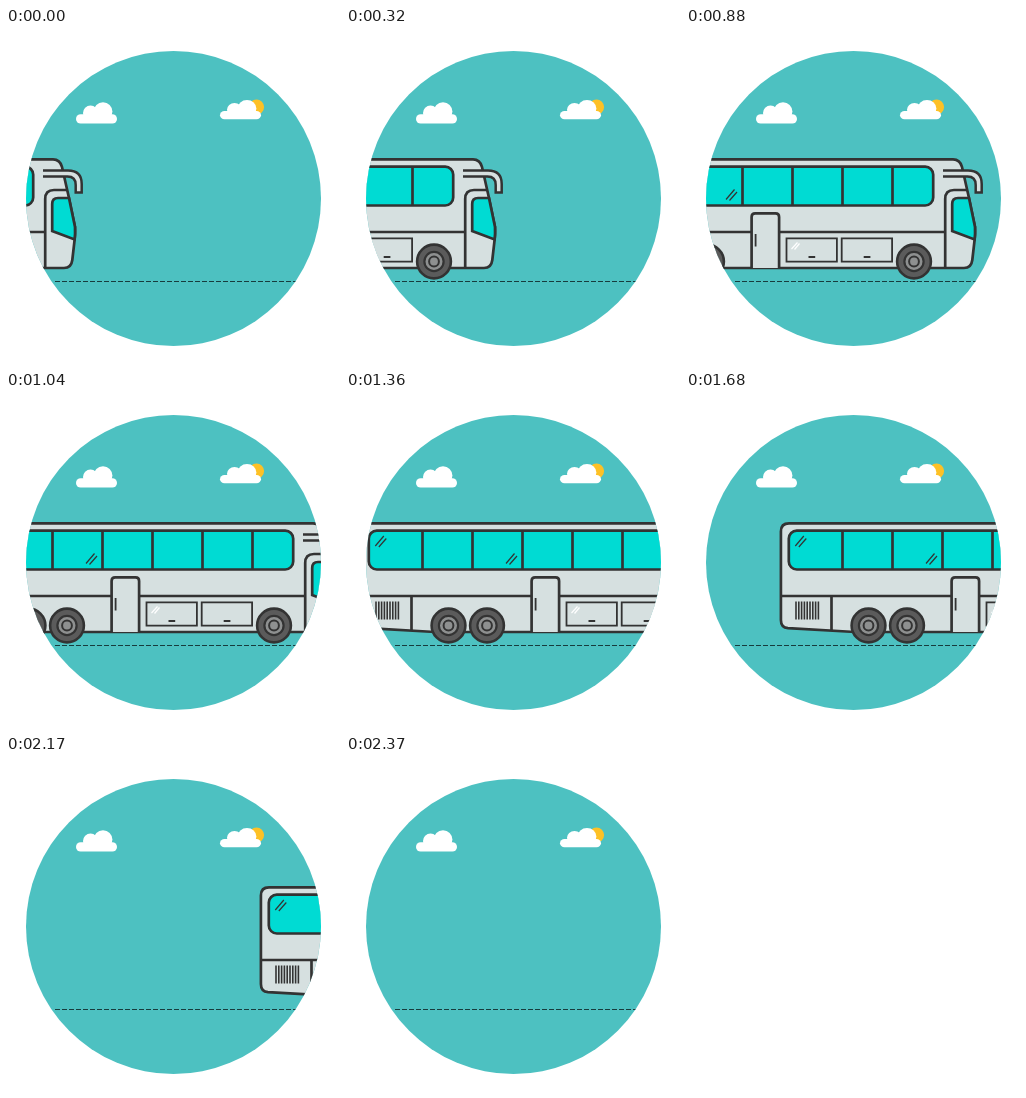
Write an HTML page with a canvas that moves like this. It is 334 by 336 pixels and loops after 2.42 s.

```html
<!DOCTYPE html>
<html lang="en">
<head>
<meta charset="utf-8">
<title>Passing coach</title>
<style>
  html, body { margin: 0; width: 100%; height: 100%; overflow: hidden; background: #fff; }
  canvas { display: block; }
</style>
</head>
<body>
<canvas id="stage" width="334" height="336"></canvas>
<script>
const ctx = document.getElementById('stage').getContext('2d');
const LOOP = 2420, STEP = 20, START = -326;
const SKY = '#4dc1c1', INK = '#333', BODY = '#d6e0e0', GLASS = '#00dbd3';

function paint(path, fill, width = 2.7, stroke = INK) {
  if (fill) {
    ctx.fillStyle = fill;
    ctx.fill(path);
  }
  if (width) {
    ctx.strokeStyle = stroke;
    ctx.lineWidth = width;
    ctx.stroke(path);
  }
}

function shape(d, fill, width, stroke) {
  paint(new Path2D(d), fill, width, stroke);
}

function line(x1, y1, x2, y2, width, stroke) {
  shape(`M${x1} ${y1}L${x2} ${y2}`, null, width, stroke);
}

function disc(x, y, r, fill, width = 0) {
  const path = new Path2D();
  path.arc(x, y, r, 0, Math.PI * 2);
  paint(path, fill, width);
}

function box(x, y, w, h, r, fill, width) {
  const path = new Path2D();
  path.roundRect(x, y, w, h, r);
  paint(path, fill, width);
}

function cloud(x, y, h) {
  box(x, y - h, 41, h, h / 2, '#fff', 0);
  disc(x + 14.5, y - 10.5, 7.5, '#fff');
  disc(x + 27, y - 12, 9.4, '#fff');
  box(x + 8, y - h - 4, 26, 8, 2, '#fff', 0);
}

function scenery() {
  ctx.fillStyle = SKY;
  ctx.fillRect(0, 0, 334, 336);
  disc(250.5, 79, 7.6, '#fdc126');
  cloud(70, 95.6, 9.4);
  ctx.save();
  ctx.translate(214, 91.2);
  ctx.scale(1, 0.9);
  cloud(0, 0, 9);
  ctx.restore();
  ctx.setLineDash([5, 2]);
  line(49, 253.5, 291, 253.5, 1, '#173c3d');
  ctx.setLineDash([]);
}

function wheel(x) {
  const y = 233.5;
  disc(x, y, 16.9, '#5b5b5b', 2.6);
  disc(x, y, 9.6, '#8e9090', 2.2);
  disc(x, y, 4.9, '#8e9090', 2);
}

function glint(x, y) {
  line(x, y + 10, x + 8.5, y, 1.2);
  line(x + 3.5, y + 11, x + 11, y + 2.5, 1.2);
}

function bus() {
  const outline = 'M9 131.4H373Q380 131.4 382 139L389 170L395 199' +
    'Q395.3 206 394.6 212L392.3 232Q391.3 240 384 240H75' +
    'L8 236.2Q.9 235.6 .9 228V139.5Q.9 131.4 9 131.4Z';
  shape(outline, BODY);
  line(1, 204, 365, 204);
  line(51.5, 204, 51.5, 238.8);

  box(8.8, 138.6, 344.4, 38.9, 8, GLASS);
  for (let x = 62.5; x < 330; x += 50) line(x, 138.6, x, 177.5);
  glint(15.3, 144);
  glint(146, 161.5);

  for (let i = 0; i < 9; i++) line(16 + i * 2.8, 209.5, 16 + i * 2.8, 227.5, 1.6);

  shape('M171.6 240V189Q171.6 185.4 175.2 185.4H195.5Q199.1 185.4 199.1 189V240', BODY);
  line(175.6, 206, 175.6, 218.5, 1.8);

  for (const x of [206.5, 261.7]) {
    box(x, 210.4, 50.4, 23.2, 0, BODY, 1.8);
    line(x + 22, 229, x + 28.7, 229, 2.2);
  }
  line(211.5, 221, 217.5, 214.5, 1.2, '#fff');
  line(214.5, 221.5, 219.5, 215.5, 1.2, '#fff');

  shape('M365.2 240V171Q365.2 162 374 162H387', null);
  shape('M372.2 203V176Q372.2 170 378 170H389L395 199Q395.3 206 394.6 211.5Z', GLASS);

  // Mirror arm, open at its left end
  shape('M363 142.6H388Q401.7 142.6 401.7 156V164.6H395.7V157' +
    'Q395.7 148.6 387.5 148.6H363', BODY, 2.5);

  [88.5, 127, 334].forEach(wheel);
}

// The coach advances in equal steps whose pace quickens near the end
function stepAt(t) {
  return t < 1920 ? Math.floor(t / 80) : 24 + Math.floor((t - 1920) / 50);
}

function draw(t) {
  ctx.clearRect(0, 0, 334, 336);
  ctx.save();
  ctx.beginPath();
  ctx.arc(167.5, 170.5, 147.5, 0, Math.PI * 2);
  ctx.clip();
  scenery();
  ctx.translate(START + STEP * stepAt(t), 0);
  bus();
  ctx.restore();
}

let origin;
function tick(now) {
  origin ??= now;
  draw((now - origin) % LOOP);
  requestAnimationFrame(tick);
}
draw(0);
requestAnimationFrame(tick);
</script>
</body>
</html>
```
